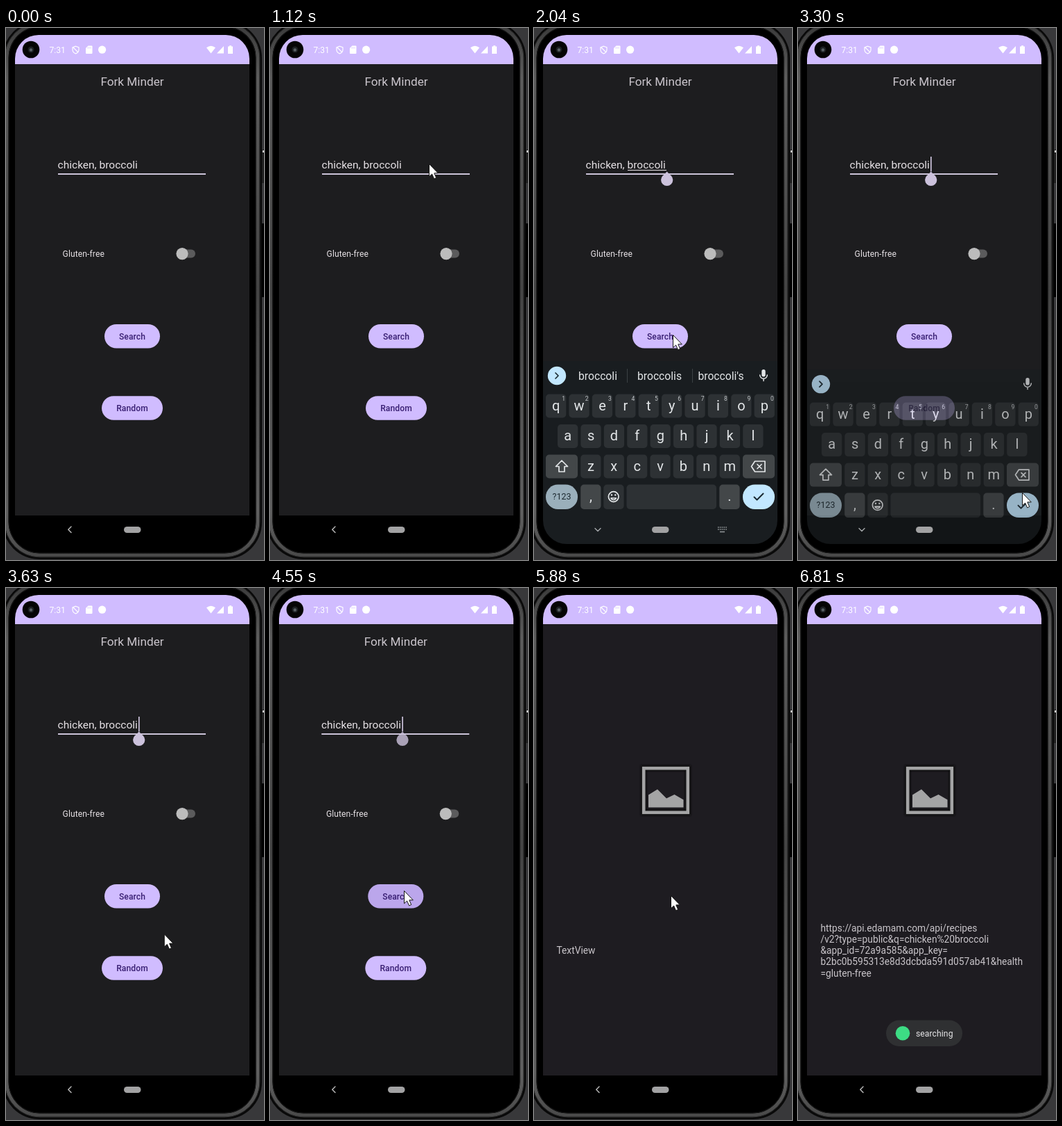
An HTML page for the animation above (8.01 s loop, 372x765 px).

```html
<!DOCTYPE html>
<html lang="en">
<head>
<meta charset="utf-8">
<title>Recipe search</title>
<style>
html, body { margin: 0; width: 100%; height: 100%; overflow: hidden; background: #38383a; }
svg { display: block; width: 372px; height: 765px; font-family: Roboto, "Noto Sans", sans-serif; }
.mid { text-anchor: middle; }
.btn { font-size: 12.1px; font-weight: 500; fill: #381e72; text-anchor: middle; letter-spacing: .1px; }
.line { fill: none; stroke-linecap: round; stroke-linejoin: round; }
</style>
</head>
<body>
<svg viewBox="0 0 372 765" xmlns="http://www.w3.org/2000/svg">
  <defs>
    <clipPath id="glass"><rect x="13" y="10" width="338" height="732" rx="34"/></clipPath>
    <clipPath id="page"><rect x="13" y="52" width="338" height="649"/></clipPath>
    <clipPath id="searchClip"><rect x="142" y="426" width="80" height="34.5" rx="17.2"/></clipPath>
    <linearGradient id="metal" x1="0" y1="0" x2="0" y2="1">
      <stop offset="0" stop-color="#3a3a3a"/><stop offset=".1" stop-color="#5c5c5c"/>
      <stop offset=".5" stop-color="#444"/><stop offset=".92" stop-color="#606060"/><stop offset="1" stop-color="#4a4a4a"/>
    </linearGradient>
    <filter id="soft" x="-20%" y="-20%" width="140%" height="140%"><feGaussianBlur stdDeviation="1.5"/></filter>
  </defs>

  <!-- phone body -->
  <rect width="372" height="765" fill="#38383a"/>
  <rect x="369" y="175" width="3" height="48" fill="#202020"/>
  <rect x="370" y="176" width="2" height="3" fill="#ddd"/>
  <rect x="369" y="281" width="3" height="106" fill="#000"/>
  <rect x="-5" y="-10" width="374" height="774" rx="53" fill="#090909"/>
  <rect x="1" y="-5" width="362" height="763" rx="48" fill="#000" stroke="url(#metal)" stroke-width="5"/>
  <rect x="-2" y="-8" width="368" height="769" rx="51" fill="none" stroke="#2b2b2b"/>
  <rect x="4" y="-2" width="356" height="757" rx="45" fill="#000" stroke="#191919"/>

  <g clip-path="url(#glass)">
    <rect x="13" y="10" width="338" height="42" fill="#d0bcff"/>
    <g clip-path="url(#page)">
      <rect x="13" y="52" width="338" height="649" fill="#1d1d1f"/>
      <g id="form">
        <text class="mid" x="182" y="83" font-size="17.2" fill="#cac5cc">Fork Minder</text>
        <text x="74.6" y="202" font-size="15.5" fill="#e6e1e5">chicken, broccoli</text>
        <path id="under" d="M135 204.5H191" stroke="#e6e1e5"/>
        <rect x="75" y="209" width="213" height="2" fill="#cbc3d8"/>
        <rect id="caret" x="191" y="185" width="1.6" height="21.5" fill="#d6cce6"/>
        <g id="handle" fill="#ccc2dc"><circle cx="191.7" cy="218.5" r="8.6"/><path d="M191.7 206.5l6.2 6.5h-12.4z"/></g>
        <text x="81.6" y="329.3" font-size="12.1" letter-spacing=".1" fill="#e6e1e5">Gluten-free</text>
        <rect x="247" y="318.5" width="26" height="12" rx="6" fill="#5b5b5c"/>
        <circle cx="254" cy="324.6" r="8.6" fill="#bcbcbc"/>
        <rect x="142" y="426" width="80" height="34.5" rx="17.2" fill="#d0bcff"/>
        <g clip-path="url(#searchClip)"><circle id="ripple" cx="193" cy="436" fill="#381e72"/></g>
        <text class="btn" x="182" y="447.7">Search</text>
        <rect x="138" y="529.3" width="88" height="34.5" rx="17.2" fill="#d0bcff"/>
        <text class="btn" x="182" y="551">Random</text>
      </g>
      <g id="result">
        <rect x="13" y="52" width="380" height="649" fill="#1e1c21"/>
        <rect x="158" y="259" width="64" height="64" fill="none" stroke="#0b0b0c" stroke-width="8" filter="url(#soft)"/>
        <rect x="158.2" y="259.2" width="63.6" height="63.6" fill="none" stroke="#a4a4a5" stroke-width="4.6"/>
        <path d="M165 315.5V297.5L178 289.5L191 302.5L202.5 297L215.5 304.5V315.5Z" fill="#a4a4a5"/>
        <g id="reply" font-size="13.76" fill="#c9c5ca"></g>
      </g>
    </g>

    <g id="ime">
      <rect x="13" y="479" width="338" height="350" fill="#191d20"/>
      <circle cx="33" cy="500" r="13.2" fill="#c2e7ff"/>
      <path class="line" d="M31 496l4 4-4 4" stroke="#1b2a33" stroke-width="1.7"/>
      <g id="words" font-size="15.7" fill="#e3e6e8" class="mid">
        <text x="92" y="506">broccoli</text><text x="181" y="506">broccolis</text><text x="269.5" y="506">broccoli's</text>
        <path d="M134.5 490v20M228.5 490v20" stroke="#3b4144"/>
      </g>
      <rect x="328.3" y="491" width="5.4" height="10.5" rx="2.7" fill="#e3e6e8"/>
      <path class="line" d="M325.7 499a5.3 5.3 0 0 0 10.6 0M331 504.5v3" stroke="#e3e6e8" stroke-width="1.5"/>
      <g id="keys" class="mid" fill="#e3e6e8"></g>
      <g class="line" stroke="#e3e6e8" stroke-width="1.7">
        <path d="M40 622l-8.5 8.5h4.5v7.500h8v-7.500h4.500z"/>
        <path d="M318.500 623h14.500v15h-14.500l-5-7.500zM322 627.500l6 6M328 627.500l-6 6"/>
        <circle cx="114.700" cy="674" r="7.300"/>
        <path d="M111 676a4 4 0 0 0 7.400 0z"/>
        <path d="M112 671.500v.1M117.300 671.500v.1" stroke-width="2.400"/>
        <path d="M317.500 674.500l4 4 9-9" stroke="#1b2a33" stroke-width="2"/>
      </g>
    </g>
  </g>

  <!-- status bar -->
  <circle cx="36" cy="31" r="12.300" fill="#050505"/>
  <circle cx="36" cy="31" r="4.500" fill="#1c2022"/><circle cx="36" cy="31.500" r="2.200" fill="#596064"/>
  <g fill="#fff">
    <text x="62.500" y="36" font-size="12.100">7:31</text>
    <path d="M100.500 26.200l4.500 1.700v3.400c0 2.600-1.800 4.600-4.500 5.600-2.700-1-4.500-3-4.500-5.600v-3.400zM97 28l7 7" fill="none" stroke="#fff" stroke-width="1.200"/>
    <path d="M118.500 25.500h5q1 0 1 1v9.500q0 1-1 1h-7.500q-1 0-1-1v-7z"/>
    <path d="M118 27.500v2M120 27.500v2M122 27.500v2" stroke="#d0bcff" stroke-width=".8"/>
    <circle cx="138.600" cy="31.200" r="5.600"/>
    <path d="M289 28.300q6.500-5 13 0l-6.500 8.200z"/>
    <path d="M304 36.500l10-10.500v10.500z"/>
    <path d="M322 25.300h3v1.200h2v10.500h-7v-10.500h2z"/>
  </g>

  <!-- navigation bar -->
  <path id="back" class="line" d="M94 717l-4.200 4.200 4.200 4.200" stroke="#bdbdbd" stroke-width="1.400"/>
  <path id="down" class="line" d="M88 719.500l4 4 4-4" stroke="#a5a9ab" stroke-width="1.400"/>
  <rect x="170" y="717" width="24.500" height="9" rx="4.500" fill="#a2a2a3"/>
  <g id="switcher" fill="none" stroke="#94999c" stroke-width="1.500">
    <path d="M265 718h13M265 721h13" stroke-dasharray="1.600 1.200"/><path d="M268 724.500h7"/>
  </g>

  <g id="toast">
    <rect x="127" y="621.500" width="110" height="37.500" rx="18.700" fill="#2f3032"/>
    <circle cx="151" cy="640.200" r="10.300" fill="#3ddc84"/>
    <text x="170" y="644.700" font-size="12.100" letter-spacing=".1" fill="#e8e8ea">searching</text>
  </g>

  <path id="cursor" d="M.5 .5V18.700L4.600 15 7.600 21.800 10.700 20.400 7.800 13.800H13.300Z" fill="#fff" stroke="#151515" stroke-linejoin="round"/>
</svg>
<script>
const LOOP = 8010;
const NS = "http://www.w3.org/2000/svg";
const $ = id => document.getElementById(id);
const clamp = v => Math.max(0, Math.min(1, v));
const span = (t, a, b) => clamp((t - a) / (b - a));
const smooth = p => p * p * (3 - 2 * p);
const within = (t, a, b) => t >= a && t < b;

function add(parent, tag, attrs, text) {
  const el = document.createElementNS(NS, tag);
  for (const k in attrs) el.setAttribute(k, attrs[k]);
  if (text) el.textContent = text;
  parent.appendChild(el);
}

function key(x, y, w, label, fill = "#2d3134", opts = {}) {
  const { rx = 5, size = 20, color = "#e3e6e8", h = 34 } = opts;
  add($("keys"), "rect", { x, y, width: w, height: h, rx, fill });
  if (label) add($("keys"), "text", { x: x + w / 2, y: y + 17 + size * .32, "font-size": size, fill: color }, label);
}

function buildKeys() {
  const pitch = 33.4, w = 29.3, gray = "#434749";
  [["qwertyuiop", 17, 526.5], ["asdfghjkl", 34, 570], ["zxcvbnm", 67.2, 613.5]].forEach(([row, left, y], r) => {
    [...row].forEach((ch, i) => {
      const x = left + i * pitch;
      key(x, y, w, ch);
      if (r === 0) add($("keys"), "text", { x: x + 25.700, y: y + 9.500, "font-size": 8.500, fill: "#c3c7ca" }, String((i + 1) % 10));
    });
  });
  key(17, 613.5, 46, "", gray);
  key(301, 613.5, 46, "", gray);
  key(17, 656.5, 46, "?123", "#9aafbb", { rx: 17.500, size: 12.500, color: "#1d2a31", h: 35.500 });
  key(67.2, 656.5, w, ",", gray, { h: 35.500 });
  key(100.3, 656.5, w, "", undefined, { h: 35.500 });
  key(133.500, 656.5, 129.500, "", undefined, { h: 35.500 });
  key(267.3, 656.5, w, ".", gray, { h: 35.500 });
  key(301, 656.5, 46, "", "#c2e7ff", { rx: 17.500, h: 35.500 });
}

const reply = [
  "https://api.edamam.com/api/recipes",
  "/v2?type=public&q=chicken%20broccoli",
  "&app_id=72a9a585&app_key=",
  "b2bc0b595313e8d3dcbda591d057ab41&health",
  "=gluten-free"
];

let replyShown = null;
function showReply(full) {
  if (full === replyShown) return;
  replyShown = full;
  $("reply").replaceChildren();
  const lines = full ? reply : ["TextView"];
  lines.forEach((s, i) => add($("reply"), "text", { x: 32.500, y: (full ? 493.700 : 526) + i * 16.200 }, s));
}

// time, x, y
const path = [
  [260, 352, 735], [1050, 230, 195], [1120, 229, 195], [1590, 229, 195], [2040, 200, 441],
  [2540, 200, 441], [3100, 335, 677], [3290, 323, 668], [3380, 323, 668], [3760, 193, 435],
  [5879, 193, 435], [5880, 197, 442], [6680, 329, 751], [6740, 332, 757], [6810, 332, 757]
];

function cursorAt(t) {
  const i = Math.max(1, path.findIndex(k => t < k[0]));
  const [a, b] = [path[i - 1], path[i]];
  const p = smooth(span(t, a[0], b[0]));
  return [a[1] + (b[1] - a[1]) * p, a[2] + (b[2] - a[2]) * p];
}

const caretOn = [[620, 1120], [1450, 1980], [2570, 3070], [3250, 3760], [4290, 4790]];

const set = (id, name, value) => $(id).setAttribute(name, value);
const fade = (id, value) => set(id, "opacity", value);

function draw(t) {
  const seen = within(t, 260, 6810);
  fade("cursor", +seen);
  if (seen) set("cursor", "transform", `translate(${cursorAt(t)})`);

  fade("caret", +caretOn.some(([a, b]) => within(t, a, b)));
  fade("handle", t < 1590 ? 0 : 1 - span(t, 4530, 4640));
  fade("under", +within(t, 1800, 3240));

  // keyboard: 0 hidden, 1 fully raised
  const rise = 1 - Math.pow(1 - span(t, 1610, 1960), 3);
  const up = t < 2500 ? rise : 1 - span(t, 3240, 3573);
  set("ime", "transform", `translate(0 ${66 * (1 - up)})`);
  fade("ime", clamp(1 - 1.4 * (1 - up)));
  fade("words", +within(t, 1980, 3240));
  fade("switcher", +within(t, 1700, 3240));
  const raised = within(t, 1620, 3540);
  fade("down", +raised);
  fade("back", +!raised);

  const press = span(t, 4420, 4620);
  set("ripple", "r", 10 + 70 * smooth(press));
  fade("ripple", within(t, 4420, 5000) ? .14 : 0);

  const open = span(t, 4520, 4950);
  const slide = 34 * (1 - Math.pow(1 - open * open, 4));
  set("form", "transform", `translate(${-slide})`);
  set("result", "transform", `translate(${34 - slide})`);
  fade("result", span(t, 4570, 4650));

  showReply(t >= 5940);
  fade("toast", smooth(span(t, 5960, 6200)));
}

buildKeys();
const start = performance.now();
function tick() {
  draw((performance.now() - start) % LOOP);
  requestAnimationFrame(tick);
}
tick();
</script>
</body>
</html>
```
